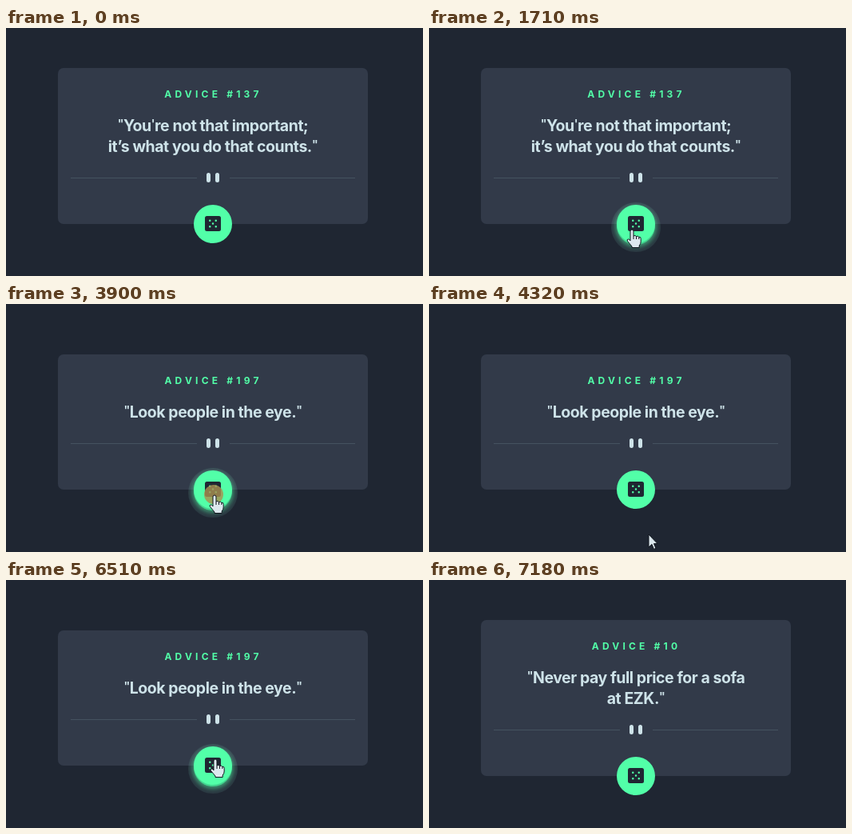
Write an HTML page that moves like this. It is 522 by 310 pixels and loops after 8 s.

```html
<!DOCTYPE html>
<html lang="en">
<head>
<meta charset="utf-8">
<title>Advice generator</title>
<style>
  html, body { margin: 0; width: 522px; height: 310px; overflow: hidden; background: #1f2632; }
  svg { display: block; }
  text { font-family: Inter, Roboto, sans-serif; text-anchor: middle; font-weight: 700; }
  #title { font-size: 12px; letter-spacing: 4.2px; fill: #52ffa8; }
  .line { font-size: 19.5px; letter-spacing: -.45px; fill: #cee3e9; }
  .quote { font-size: 14px; baseline-shift: 4px; }
  .pointer { fill: #dce8ee; stroke: #10151d; stroke-width: 1; stroke-linejoin: round; }
</style>
</head>
<body>
<svg width="522" height="310" viewBox="0 0 522 310">
  <defs>
    <filter id="blur" x="-50%" y="-50%" width="200%" height="200%"><feGaussianBlur stdDeviation="2.5"/></filter>
  </defs>
  <rect id="card" x="65" width="388" rx="7" fill="#323a49"/>
  <g id="top">
    <text id="title" x="259.5" y="37"></text>
    <text class="line" x="259" y="79"></text>
    <text class="line" x="259" y="105"></text>
  </g>
  <!-- origin: centre of the button -->
  <g id="bottom">
    <path d="M-178-57.5H-20M21-57.5H178" stroke="#455260"/>
    <path d="M-5.5-61.5v7M5.5-61.5v7" stroke="#cee3e9" stroke-width="5" stroke-linecap="round"/>
    <g id="glow">
      <circle cy="4" r="31" fill="#7fb8a8" opacity=".13"/>
      <circle cy="3" r="26" fill="#52ffa8" opacity=".45" filter="url(#blur)"/>
      <circle cy="2" r="24" fill="#43d48f"/>
    </g>
    <circle r="24" fill="#52ffa8"/>
    <rect x="-10" y="-10" width="20" height="19" rx="2.5" fill="#1f2632"/>
    <path d="M-3.75-4.25h0M3.75-4.25h0M0-.5h0M-3.75 3.25h0M3.75 3.25h0"
          stroke="#52ffa8" stroke-width="2.5" stroke-linecap="round"/>
  </g>
  <!-- origin: hot spot -->
  <g id="cursor">
    <circle id="click" r="12" fill="#a89050" opacity=".82"/>
    <path id="arrow" class="pointer" d="M0 0V16l4-3.6 2.5 6 2.5-1-2.5-5.8H11z"/>
    <path id="hand" class="pointer" d="M-1 3a2 2 0 0 1 4 0v6q2-1.5 3.5.5q2-1 3.3.8q2.4-.6 2.4 2V16q0 3-2 5v2.5H1V22q-2.5-3-5.5-6.5q-1.2-2.2.8-2.6q1.5 0 2.7 2zM3 9v4M6.5 9.5V13M9.8 10.3V13"/>
  </g>
</svg>
<script>
const LOOP = 8000;
const advice = [
  { from: 0, id: 137, lines: ['"You\'re not that important;', 'it’s what you do that counts."'] },
  { from: 2630, id: 197, lines: ['"Look people in the eye."'] },
  { from: 7180, id: 10, lines: ['"Never pay full price for a sofa', 'at EZK."'] }
];
// time, x, y of the pointer's hot spot
const path = [
  [510, 440, 142], [1100, 253, 251],
  [3320, 253, 251], [3440, 260, 238],
  [3970, 260, 238], [4320, 275, 288],
  [5979, 275, 288], [5980, 274, 282], [6170, 262, 236],
  [6320, 262, 236], [6510, 261, 223],
  [6780, 261, 223], [7110, 262, 312]
];
const clicks = [[1570, 1710], [3900, 3970], [6710, 6780]];

const $ = id => document.getElementById(id);
const lines = document.querySelectorAll('.line');
const show = (id, on) => $(id).setAttribute('visibility', on ? 'visible' : 'hidden');
const move = (id, x, y) => $(id).setAttribute('transform', `translate(${x} ${y})`);
const smallQuotes = (s = '') => s.replace(/["']/g, '<tspan class=quote>$&</tspan>');

function pointerAt(t) {
  const i = path.findIndex(p => p[0] > t);
  if (i < 1) return null;
  const [t0, x0, y0] = path[i - 1], [t1, x1, y1] = path[i];
  const k = (t - t0) / (t1 - t0);
  return [x0 + (x1 - x0) * k, y0 + (y1 - y0) * k];
}

let current;
function showAdvice(item) {
  if (item === current) return;
  current = item;
  $('title').textContent = 'ADVICE #' + item.id;
  lines.forEach((el, i) => el.innerHTML = smallQuotes(item.lines[i]));
  const height = 143 + 26 * item.lines.length;
  item.top = 147.5 - height / 2;
  item.bottom = item.top + height;
  $('card').setAttribute('y', item.top);
  $('card').setAttribute('height', height);
  move('top', 0, item.top);
  move('bottom', 259, item.bottom);
}

function draw(t) {
  showAdvice(advice.findLast(a => a.from <= t));
  const p = pointerAt(t);
  const hover = !!p && Math.hypot(p[0] - 259, p[1] - current.bottom) < 24;
  if (p) move('cursor', ...p);
  show('glow', hover);
  show('hand', hover);
  show('arrow', p && !hover);
  show('click', clicks.some(([a, b]) => t >= a && t < b));
}

const start = performance.now();
function frame() {
  draw((performance.now() - start) % LOOP);
  requestAnimationFrame(frame);
}
frame();
</script>
</body>
</html>
```
